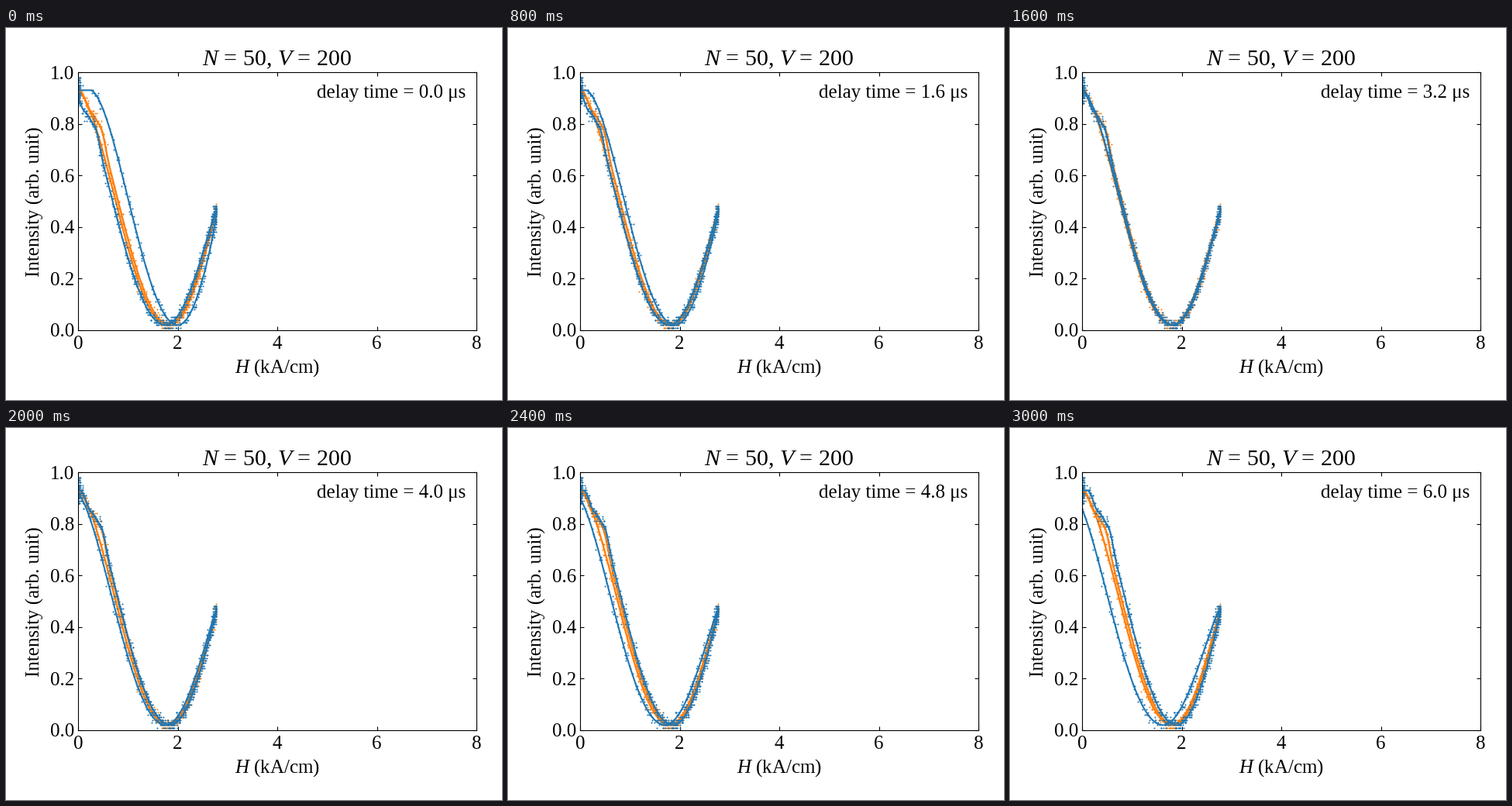
Recreate the animation shown at these times as a matplotlib script. Size 640x480 px, loop 3100 ms.

```python
import numpy as np
import matplotlib.pyplot as plt
from matplotlib.animation import FuncAnimation

W, H, DPI = 640, 480, 100
LEFT, RIGHT, TOP, BOTTOM = 93, 607, 57, 390
FRAMES, STEP = 31, 0.2
PEAK, DIP = 2.778, 1.82
BLUE, ORANGE = "C0", "C1"

plt.rcParams.update({
    "font.family": "Liberation Serif",
    "font.size": 18,
    "mathtext.fontset": "custom",
    "mathtext.rm": "Liberation Serif",
    "mathtext.it": "Liberation Serif:italic",
    "xtick.direction": "in",
    "ytick.direction": "in",
    "xtick.top": True,
    "ytick.right": True,
    "xtick.major.pad": 4.9,
})


def intensity(field, kink):
    """Transmitted light; the kink appears only while the field rises."""
    h = np.maximum(field, 0)
    power = np.where(h < DIP, 0.86, 0.95)
    level = 0.02 + 0.91 * np.cos(np.pi / 2 * (h / DIP) ** power) ** 2
    if kink:
        level += 0.035 * np.exp(-((h - 0.46) / 0.09) ** 2)
        level -= 0.03 * np.exp(-((h - 0.18) / 0.09) ** 2)
    return level


class Branch:
    """One side of the field pulse; the delay shifts its phase."""

    def __init__(self, rate, balance, kink, count, rng):
        self.rate, self.balance = rate, balance
        self.phase = np.linspace(-0.1, np.pi / 2, 300)
        self.level = intensity(PEAK * np.sin(self.phase), kink)
        self.dot_phase = rng.uniform(0, np.pi / 2, count)
        self.jitter = rng.normal(0, 0.02, count)
        exact = intensity(PEAK * np.sin(self.dot_phase), kink)
        noisy = np.round(exact + rng.normal(0, 0.01, count), 2)
        self.dots = np.clip(noisy, 0.01, 0.98)

    def field(self, phase, delay, jitter=0):
        shifted = phase + self.rate * (delay - self.balance)
        return np.clip(PEAK * np.sin(shifted) + jitter, 0, PEAK)

    def line_at(self, delay):
        return self.field(self.phase, delay), self.level

    def dots_at(self, delay):
        return self.field(self.dot_phase, delay, self.jitter), self.dots


rng = np.random.default_rng(7)
falling = Branch(-0.03, 3.0, False, 260, rng)
rising = Branch(0.0115, 2.8, True, 620, rng)
slow_up = Branch(0.0115, 2.8, True, 300, rng)
slow_down = Branch(0.0115, 2.8, False, 300, rng)

fig = plt.figure(figsize=(W / DPI, H / DPI), dpi=DPI)
ax = fig.add_axes([LEFT / W, 1 - BOTTOM / H,
                   (RIGHT - LEFT) / W, (BOTTOM - TOP) / H])
ax.set(xlim=(0, 8), ylim=(0, 1), xticks=range(0, 9, 2))
ax.set_title("$N$ = 50, $V$ = 200")
fig.text(350.5 / W, 1 - 445 / H, "$H$ (kA/cm)", ha="center", va="baseline")
fig.text(44 / W, 1 - 224 / H, "Intensity (arb. unit)", rotation=90,
         rotation_mode="anchor", ha="center", va="baseline")
label = ax.text(0.6, 0.9, "", transform=ax.transAxes)


def dots(x, y, color):
    return ax.plot(x, y, "o", ms=1, mew=0.4, color=color)[0]


# Slow reference loop
for branch, delay in ((slow_up, 3.6), (slow_down, 2.0)):
    dots(*branch.dots_at(delay), ORANGE)
    ax.plot(*branch.line_at(delay), color=ORANGE, lw=1.7)

# Samples taken while the field is off
idle = np.round(rng.normal(0.93, 0.022, 130), 2)
dots(np.abs(rng.normal(0, 0.022, 130)), np.clip(idle, 0.88, 0.98), BLUE)

branches = (falling, rising)
clouds = [dots([], [], BLUE) for _ in branches]
lines = [ax.plot([], [], color=BLUE, lw=1.5)[0] for _ in branches]


def draw(i):
    delay = i * STEP
    for branch, cloud, line in zip(branches, clouds, lines):
        cloud.set_data(*branch.dots_at(delay))
        line.set_data(*branch.line_at(delay))
    label.set_text(f"delay time = {delay:.1f} μs")
    return [*clouds, *lines, label]


anim = FuncAnimation(fig, draw, frames=FRAMES, interval=100,
                     init_func=lambda: draw(0), repeat=True)
plt.show()
```
